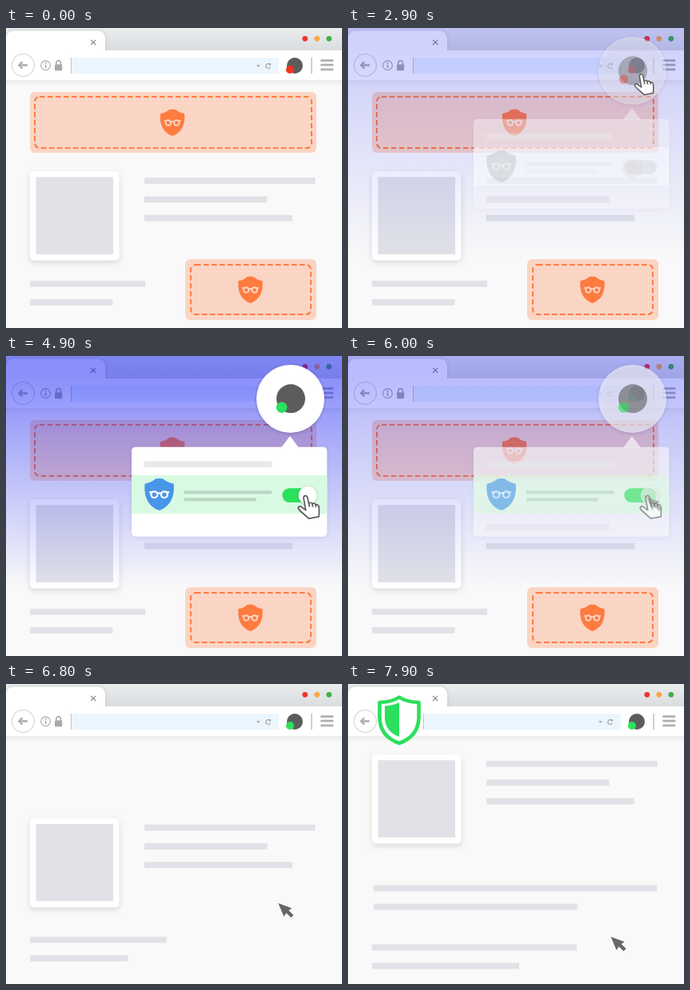
Write an HTML page with a canvas that moves like this. It is 420x375 px and loops after 8 s.

```html
<!DOCTYPE html>
<html lang="en">
<head>
<meta charset="utf-8">
<title>Blocking ads in a browser</title>
<style>
html, body { margin: 0; width: 100%; height: 100%; overflow: hidden; background: #f9f9f9; }
canvas { display: block; width: 420px; height: 375px; }
</style>
</head>
<body>
<canvas id="stage"></canvas>
<script>
const canvas = document.getElementById('stage');
const ctx = canvas.getContext('2d');
const ratio = window.devicePixelRatio || 1;
canvas.width = 420 * ratio;
canvas.height = 375 * ratio;

const LOOP = 8000, STEP = 100;
const ORANGE = '#ff7b40', PEACH = '#fad5c4', BAR = '#e1e2e7';
const GREEN = '#2be05c', RED = '#f5321f', INK = '#5c5c5c', ICON = '#b0b0b0';

const mix = (a, b, p) => a + (b - a) * p;
const ramp = (t, from, to) => Math.min(1, Math.max(0, (t - from) / (to - from)));

function rect(x, y, w, h, color) {
  ctx.fillStyle = color;
  ctx.fillRect(x, y, w, h);
}

function round(x, y, w, h, r) {
  ctx.beginPath();
  ctx.roundRect(x, y, w, h, r);
}

function fillRound(x, y, w, h, r, color) {
  round(x, y, w, h, r);
  ctx.fillStyle = color;
  ctx.fill();
}

function disc(x, y, r, color) {
  ctx.beginPath();
  ctx.arc(x, y, r, 0, Math.PI * 2);
  ctx.fillStyle = color;
  ctx.fill();
}

function ring(x, y, r, color, width) {
  ctx.beginPath();
  ctx.arc(x, y, r, 0, Math.PI * 2);
  ctx.strokeStyle = color;
  ctx.lineWidth = width;
  ctx.stroke();
}

function line(points, color, width) {
  ctx.beginPath();
  points.forEach(([x, y]) => ctx.lineTo(x, y));
  ctx.strokeStyle = color;
  ctx.lineWidth = width;
  ctx.stroke();
}

function polygon(points, color) {
  ctx.beginPath();
  points.forEach(([x, y]) => ctx.lineTo(x, y));
  ctx.fillStyle = color;
  ctx.fill();
}

function fade(alpha, draw) {
  if (alpha <= 0) return;
  ctx.save();
  ctx.globalAlpha *= alpha;
  draw();
  ctx.restore();
}

function shadow(color, blur, dy, draw) {
  ctx.save();
  ctx.shadowColor = color;
  ctx.shadowBlur = blur * ratio;
  ctx.shadowOffsetY = dy * ratio;
  draw();
  ctx.restore();
}

function at(x, y, scale, draw) {
  ctx.save();
  ctx.translate(x, y);
  ctx.scale(scale, scale);
  draw();
  ctx.restore();
}

function verticalGradient(y0, y1, from, to) {
  const g = ctx.createLinearGradient(0, y0, 0, y1);
  g.addColorStop(0, from);
  g.addColorStop(1, to);
  return g;
}

const maskPath = new Path2D('M-4-16.3Q0-17.2 4-16.3C7-13.6 10-12.2 15-11.2' +
  'C16.5 2 11.5 13 0 16.7C-11.5 13-16.5 2-15-11.2C-10-12.2-7-13.6-4-16.3Z');
const handPath = new Path2D('M10.2 19.5L7.6 5C7 1 11.4.1 12.4 3.7L14 11.2' +
  'C14.9 9.5 17.6 9.7 18.3 11.7C19.6 10.3 22 10.9 22.6 12.9' +
  'C24.2 11.8 26.1 12.9 26.5 14.8C27.3 18.4 27 22.5 26.6 27.6L14 30' +
  'C11.4 26.9 5.5 23.4 1.4 18.2C-.3 15.7 2.4 13.8 4.7 15.4Z');
const knucklePath = new Path2D('M14 11.2L14.8 15.4M18.3 11.7L19 15.4M22.6 12.9L23.1 15.8');
const badgePath = new Path2D('M0-28.5C-7-23.5-15-22.5-24.5-22V-4C-24.5 14-14 24-0 29' +
  'C14 24 24.5 14 24.5-4V-22C15-22.5 7-23.5 0-28.5Z');
const badgeHalf = new Path2D('M0-22C-5-19.5-11-18-18-17.5V-3C-18 9-11 17 0 21Z');

function maskShield(x, y, scale, color, glasses) {
  at(x, y, scale, () => {
    ctx.fillStyle = color;
    ctx.fill(maskPath);
    ring(-5.2, .2, 3.3, glasses, 1.9);
    ring(5.2, .2, 3.3, glasses, 1.9);
    line([[-10.4, -2.2], [-7, -2.4]], glasses, 1.9);
    line([[10.4, -2.2], [7, -2.4]], glasses, 1.9);
    line([[-3, -1.3], [3, -1.3]], glasses, 1.9);
  });
}

function drawAd(x, y, w, cx, inset) {
  fillRound(x, y, w, 76, 6, PEACH);
  ctx.save();
  ctx.strokeStyle = ORANGE;
  ctx.lineWidth = 2;
  ctx.setLineDash([6.5, 3.5]);
  round(x + inset, y + inset, w - 2 * inset, 76 - 2 * inset, 6);
  ctx.stroke();
  ctx.restore();
  maskShield(cx, y + 38.3, 1, ORANGE, PEACH);
}

function drawArrow(x, y) {
  at(x, y, 1, () => polygon(
    [[0, 0], [17, 6.2], [13, 9], [19, 14.8], [16, 18], [10, 12.2], [7, 16.8]], '#666'));
}

function drawHand(x, y, scale) {
  at(x, y, scale, () => {
    ctx.fillStyle = '#fff';
    ctx.fill(handPath);
    ctx.strokeStyle = INK;
    ctx.lineWidth = 1.7;
    ctx.lineJoin = 'round';
    ctx.stroke(handPath);
    ctx.stroke(knucklePath);
  });
}

function drawPage(t) {
  rect(0, 65, 420, 310, '#f9f9f9');

  const p = ramp(t, 6700, 7500), lowerP = ramp(t, 6800, 7500);
  const lift = -91 * p;
  shadow('rgba(0,0,0,.12)', 7, 3, () => fillRound(30, 179 + lift, 111.5, 111.5, 5, '#fff'));
  rect(37.5, 186.3 + lift, 96.5, 96.5, BAR);
  [[213.5, 187], [153.5, 210.5], [185, 233.7]]
    .forEach(([w, y]) => rect(173, y + lift, w, 7.7, BAR));

  const x = mix(30, 32, p), y = mix(315.8, 251.5, lowerP);
  rect(x, y, mix(144, 354, p), 7.7, BAR);
  rect(x, y + 23.2, mix(103.5, 254.5, p), 7.7, BAR);
  const tail = mix(395.5, 325.4, lowerP);
  rect(30, tail, 256, 7.7, BAR);
  rect(30, tail + 23.2, 184, 7.7, BAR);

  fade(1 - ramp(t, 6300, 6700), () => {
    drawAd(30, 80, 358, 208, 6);
    drawAd(224, 289, 164, 305.5, 7);
  });
}

function drawTabs() {
  rect(0, 0, 420, 28, verticalGradient(0, 28, '#eaecee', '#dadddf'));
  ctx.save();
  ctx.beginPath();
  ctx.rect(0, 0, 420, 28);
  ctx.clip();
  shadow('rgba(0,0,0,.14)', 4, 0, () => fillRound(0, 3.5, 124, 40, 9, '#fff'));
  ctx.restore();
  line([[106, 14.8], [112.2, 21]], '#888', 1.1);
  line([[112.2, 14.8], [106, 21]], '#888', 1.1);
  [[373.8, '#f0352c'], [388.8, '#fba63f'], [403.8, '#43b04c']]
    .forEach(([x, color]) => disc(x, 13.3, 3.4, color));
}

function drawToolbar(t) {
  rect(0, 28, 420, 37, '#fff');
  rect(0, 65, 420, 8, verticalGradient(65, 73, '#ececec', '#f9f9f9'));

  disc(21.5, 46.5, 14, '#fff');
  ring(21.5, 46.5, 14, '#d4d4d4', 1.1);
  line([[27, 46.5], [17, 46.5]], ICON, 2.6);
  line([[20.4, 42.4], [16.3, 46.5], [20.4, 50.6]], ICON, 2.5);

  ring(49.5, 46.8, 5.9, '#a8a8a8', 1.1);
  disc(49.5, 43.8, 1, '#a8a8a8');
  rect(48.7, 45.7, 1.7, 4.5, '#a8a8a8');

  fillRound(61, 45.6, 9.2, 7.6, 1, '#a8a8a8');
  ctx.beginPath();
  ctx.arc(65.6, 43.6, 2.8, Math.PI, 0);
  ctx.lineTo(68.4, 46);
  ctx.moveTo(62.8, 43.6);
  ctx.lineTo(62.8, 46);
  ctx.strokeStyle = '#a8a8a8';
  ctx.lineWidth = 1.6;
  ctx.stroke();

  rect(82, 37.3, 259, 20, '#ebf6ff');
  rect(81, 37, 1, 20, '#c4c4c4');
  polygon([[313, 46.3], [318, 46.3], [315.5, 49]], '#aaa');
  ctx.beginPath();
  ctx.arc(327.8, 47.5, 2.9, .5, 5.3);
  ctx.strokeStyle = '#aaa';
  ctx.lineWidth = 1.3;
  ctx.stroke();
  rect(328.5, 44, 2.6, 2.6, '#aaa');

  disc(361, 47, 10, INK);
  disc(355, 52, 5, t < 4900 ? RED : GREEN);
  rect(381.3, 37, 1.4, 20, '#bcbcbc');
  for (const y of [39.2, 44.8, 50.4]) fillRound(393.3, y, 16, 2.8, .6, ICON);
}

function drawPopup(on) {
  rect(0, 0, 420, 375, verticalGradient(25, 290, 'rgba(21,31,247,.5)', 'rgba(21,31,247,0)'));

  shadow('rgba(60,60,140,.12)', 6, 1, () => fillRound(157, 113.7, 244.3, 112, 5, '#fff'));
  polygon([[344, 114.5], [355, 100], [366, 114.5]], '#fff');

  rect(173, 131.5, 159, 7.7, '#e5e9e9');
  rect(157, 149, 244.3, 48, on ? '#d9fae2' : '#f9fefe');
  maskShield(191.6, 173, 1.2, on ? '#4796e8' : '#b5b8ba', '#fff');
  const detail = on ? '#bbd6c5' : '#dfe3e3';
  rect(222.7, 168.3, 109.5, 4.2, detail);
  rect(222.7, 177.3, 90, 4.2, detail);
  fillRound(345.3, 165.2, 40.7, 17.8, 8.9, on ? GREEN : '#cdced1');
  shadow('rgba(0,0,0,.25)', 3, .5, () => disc(on ? 377 : 354.5, 174.2, 11.3, '#fff'));

  shadow('rgba(50,50,110,.35)', 4, 1, () => disc(355.5, 53.5, 42.5, '#fff'));
  disc(356, 53.3, 18, INK);
  disc(344.6, 64.2, on ? 6.8 : 5.7, on ? GREEN : RED);
}

function drawBadge() {
  rect(42, 37, 52, 21, '#fff');
  rect(94, 37, 1, 20, '#c4c4c4');
  at(64, 45, 1, () => {
    ctx.fillStyle = '#fff';
    ctx.fill(badgePath);
    ctx.strokeStyle = GREEN;
    ctx.lineWidth = 4.6;
    ctx.lineJoin = 'round';
    ctx.stroke(badgePath);
    ctx.fillStyle = GREEN;
    ctx.fill(badgeHalf);
  });
}

function drawPointer(t) {
  if (t < 500) return;
  if (t < 1400) {
    const p = ramp(t, 500, 1300);
    drawArrow(mix(62, 317, p), mix(301, 138, p));
  } else if (t < 1800) {
    const p = ramp(t, 1300, 1800);
    drawArrow(mix(317, 364, p), mix(138, 54, p));
  } else if (t < 6300) {
    const open = ramp(t, 2700, 3200), move = ramp(t, 3400, 3900);
    const leave = ramp(t, 5800, 6300);
    const x = mix(mix(358, 357, open), 364.5, move);
    const y = mix(mix(51.8, 63.6, open), 173.2, move);
    fade(1 - leave, () => drawHand(x, y, mix(.83, 1, open)));
    fade(leave, () => drawArrow(373, 176));
  } else {
    const p = ramp(t, 6300, 6700), q = ramp(t, 6700, 7500);
    drawArrow(mix(mix(373, 342, p), 328.6, q), mix(mix(176, 268, p), 316, q));
  }
}

function render(t) {
  ctx.setTransform(ratio, 0, 0, ratio, 0, 0);
  drawPage(t);
  drawTabs();
  drawToolbar(t);
  const popup = ramp(t, 2700, 3200) - ramp(t, 5800, 6300);
  fade(popup, () => drawPopup(t >= 4900));
  fade(ramp(t, 7500, 7900), drawBadge);
  drawPointer(t);
}

const start = performance.now();
function tick() {
  const elapsed = (performance.now() - start) % LOOP;
  render(Math.floor(elapsed / STEP) * STEP);
  requestAnimationFrame(tick);
}
tick();
</script>
</body>
</html>
```
